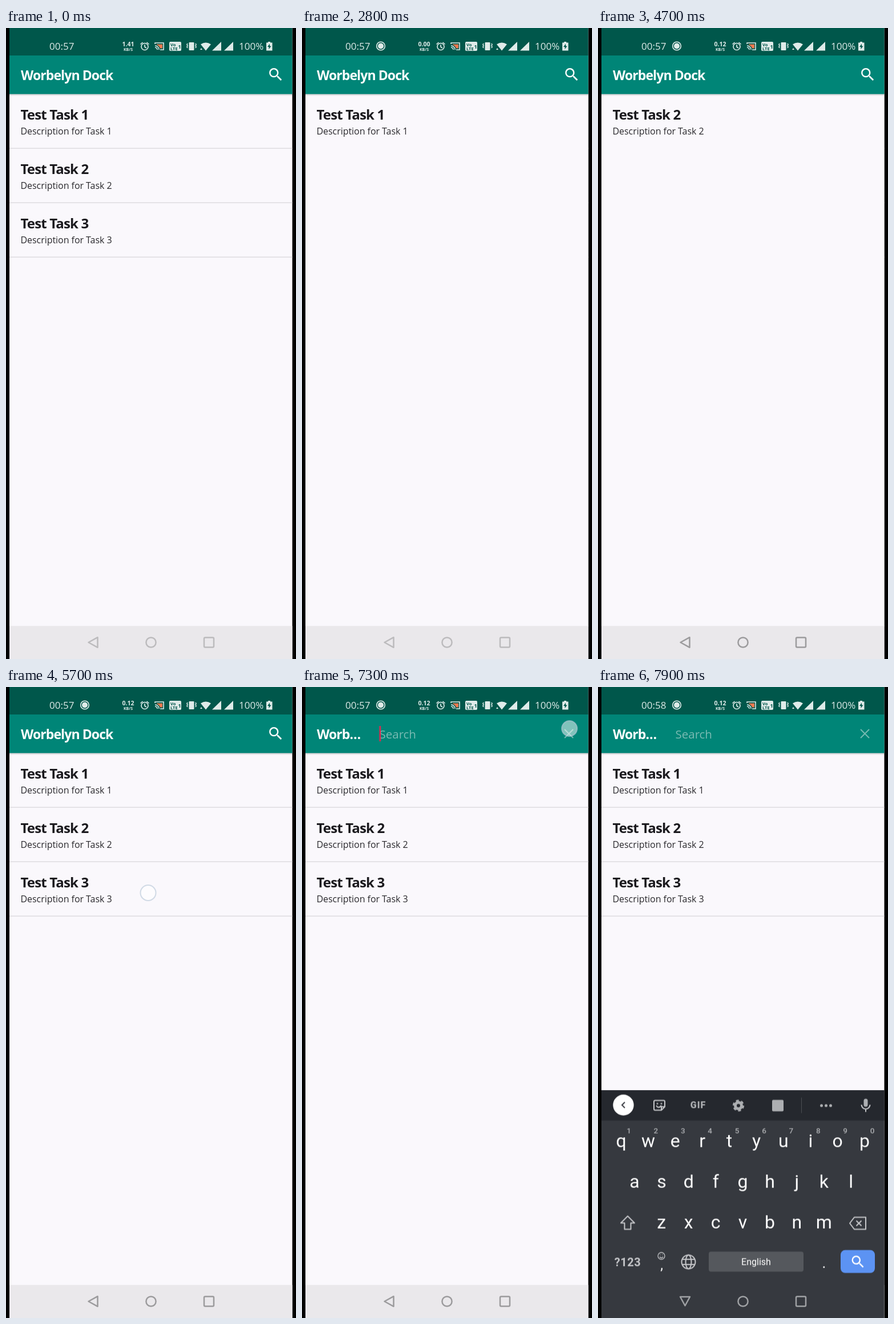
Recreate the animation shown at these times as an HTML page. Size 508 by 1102 pixels, loop 8 s.

```html
<!DOCTYPE html>
<html lang="en">
<head>
<meta charset="utf-8">
<title>Task list</title>
<style>
  html, body { margin: 0; width: 100%; height: 100%; overflow: hidden; background: #000; }
  svg { display: block; width: 100vw; height: 100vh; }
  text { font-family: "Open Sans", "Noto Sans", sans-serif; }
  .status { fill: #dfebe9; }
  .status text { font-size: 17px; }
  .status .tiny { font-size: 10.5px; font-weight: 700; text-anchor: middle; }
  .line { fill: none; stroke: #dfebe9; stroke-width: 1.6; }
  .title { font-size: 23px; font-weight: 700; letter-spacing: -.9px; fill: #fff; }
  .hint { font-size: 20.5px; fill: #7abbb3; }
  .name { font-size: 24px; font-weight: 700; letter-spacing: -.85px; fill: #1b1a1e; }
  .desc { font-size: 16px; letter-spacing: -.05px; fill: #2a292d; }
  .nav { fill: none; stroke-width: 2.5; stroke-linejoin: round; }
  .light { animation: wake 8s linear infinite; }
  .dark { stroke: #9fa1a4; }
  .keys text { font-family: Roboto, "Noto Sans", sans-serif; text-anchor: middle; fill: #fff; }
  .keys .letter { font-size: 32px; }
  .keys .digit { font-size: 13.5px; font-weight: 500; fill: #adafb2; }
  .outline { fill: none; stroke: #c6c7ca; stroke-width: 2; stroke-linejoin: round; }
  .tool { fill: #adafb2; }

  .tap, .press { animation: tap 8s linear infinite; animation-delay: calc(var(--at) - 8.04s); }
  .tap circle { fill: #fff; fill-opacity: .5; stroke: #b4c5d5; stroke-opacity: .6; stroke-width: 2; }
  .press { animation-name: press; transform-box: fill-box; transform-origin: center; }
  .record { animation: record 8s linear infinite; transform-origin: 138px 31px; }
  .keyboard { animation: appear 8s linear infinite; }
  .keys { animation: rise 8s linear infinite; }

  @keyframes tap { 0%, .6% { opacity: 1 } 2.6%, 100% { opacity: 0 } }
  @keyframes press {
    0% { opacity: .2; transform: scaleX(.4) }
    1.2%, 1.9% { opacity: 1; transform: none }
    5%, 100% { opacity: 0; transform: none }
  }
  @keyframes wake { 0%, 43.7% { stroke: #bcbbbd } 47.5%, 100% { stroke: #9c9b9d } }
  @keyframes record { 0%, 1% { opacity: 0; transform: scale(.4) } 5%, 100% { opacity: 1; transform: none } }
  @keyframes appear { 0%, 91.9% { opacity: 0 } 91.91% { opacity: .86 } 94.6%, 100% { opacity: 1 } }
  @keyframes rise { 0%, 91.9% { transform: translateY(11.5px) } 94.6%, 100% { transform: none } }
</style>
</head>
<body>
<svg viewBox="0 0 508 1102">
  <defs>
    <path id="lens" d="M15.5 14h-.79l-.28-.27A6.47 6.47 0 0 0 16 9.5 6.5 6.5 0 1 0 9.5 16c1.61 0 3.09-.59 4.23-1.57l.27.28v.79l5 4.99L20.49 19zm-6 0C7.01 14 5 11.99 5 9.5S7.01 5 9.5 5 14 7.01 14 9.5 11.99 14 9.5 14z"/>
    <g id="homeRecents"><circle cx="254" cy="1073" r="8.6"/><rect x="347" y="1064.5" width="17" height="17" rx="2"/></g>
    <linearGradient id="shade" x2="0" y2="1"><stop stop-opacity=".2"/><stop offset="1" stop-opacity="0"/></linearGradient>
  </defs>

  <rect width="508" height="1102"/>
  <rect x="6" width="495.5" height="1102" fill="#faf8fc"/>
  <g id="list"></g>
  <g id="pages"></g>

  <rect x="6" y="115" width="495.5" height="4" fill="url(#shade)"/>
  <rect x="6" y="48" width="495.5" height="67.4" fill="#008577"/>
  <rect x="6" width="495.5" height="48" fill="#00574b"/>

  <g class="status">
    <text x="76" y="37.5" data-on="0-7700">00:57</text>
    <text x="76" y="37.5" data-on="7700-8000">00:58</text>
    <g class="record"><circle class="line" cx="138" cy="31.5" r="7.3"/><circle cx="138" cy="31.5" r="5"/></g>
    <text class="tiny" x="214" y="32" data-on="0-2000">1.41</text>
    <text class="tiny" x="214" y="32" data-on="2000-4700">0.00</text>
    <text class="tiny" x="214" y="32" data-on="4700-8000">0.12</text>
    <text class="tiny" x="214" y="39.5" style="font-size:7px">KB/S</text>
    <path class="line" d="M243 29v4l3 2M235.5 28.5l4-3.5M250.5 28.5l-4-3.5"/>
    <circle class="line" cx="243" cy="32.5" r="6"/>
    <path class="line" d="M261 28v-2h15v12h-6M261 31a7 7 0 0 1 7 7M261 34a4 4 0 0 1 4 4"/>
    <path d="M264 28.5h10v7h-4q-2-5-6-6z" fill="#f0784f"/>
    <rect x="286" y="24" width="21" height="16" rx="2"/>
    <g fill="#00574b" font-weight="700">
      <text x="288" y="31.5" style="font-size:7.5px">Vo</text><text x="288" y="39" style="font-size:7.5px">LTE</text>
      <text x="301.5" y="36" style="font-size:9px">1</text>
    </g>
    <rect x="320.5" y="25" width="9" height="14" rx="1"/>
    <path class="line" d="M318 27l-1 2 1 2-1 2 1 2M332 27l1 2-1 2 1 2-1 2"/>
    <path d="M341 28.5q9-6 18 0L350 39.5zM361 39.5L377 24v15.5zM382 39.5L398 24v15.5z"/>
    <path d="M342 35l2 3h-4z"/>
    <text x="408" y="37.5">100%</text>
    <path d="M459 24h4v1.5h3.5v14H456v-14h3z"/>
    <path d="M462 27.5l-4 5.5h2.5v4l4-5.5H462z" fill="#00574b"/>
  </g>

  <g data-on="0-7300">
    <text class="title" x="26" y="90.5">Worbelyn Dock</text>
    <use href="#lens" transform="translate(457.3 66.2) scale(1.257)" fill="#fff"/>
  </g>
  <g data-on="7300-8000">
    <text class="title" x="26" y="90.5">Worb…</text>
    <text class="hint" x="135.5" y="89.5">Search</text>
    <path d="M460 74l15 15M475 74l-15 15" stroke="#74b9b0" stroke-width="2"/>
    <rect x="135.5" y="68" width="2.5" height="27" fill="#e0264f" data-on="7300-7800"/>
  </g>

  <rect x="6" y="1044.3" width="495.5" height="58" fill="#eae8eb"/>
  <g id="presses" fill="#000" fill-opacity=".135"></g>
  <g class="nav light"><path d="M144.5 1073l16-8.8v17.6z"/><use href="#homeRecents"/></g>

  <g class="keyboard">
    <g class="keys">
      <rect x="6" y="704" width="495.5" height="420" fill="#36393f"/>
      <rect x="6" y="704" width="495.5" height="53" fill="#25282e"/>
      <circle cx="44.5" cy="730" r="18.2" fill="#fff"/>
      <path d="M47 725l-5 5 5 5" fill="none" stroke="#3a3d42" stroke-width="2"/>
      <g class="tool">
        <path class="outline" d="M100 722h15q2 0 2 2v9l-6 6h-11q-2 0-2-2v-13q0-2 2-2zM117 733h-6v6M102 731q4 6 9 0"/>
        <circle cx="104" cy="727.5" r="1.5"/><circle cx="111" cy="727.5" r="1.5"/>
        <text x="175.5" y="735.5" style="font-size:16px;font-weight:900;letter-spacing:1px;fill:#adafb2">GIF</text>
        <g fill="none" stroke="#adafb2"><circle cx="246" cy="731" r="5.5" stroke-width="5"/><circle cx="246" cy="731" r="8.7" stroke-width="3" stroke-dasharray="5 4.11"/></g>
        <rect x="305" y="721" width="20" height="20" rx="2"/>
        <rect x="356" y="717" width="1" height="27" fill="#4b4e53"/>
        <circle cx="391.5" cy="731" r="2.5"/><circle cx="399.5" cy="731" r="2.5"/><circle cx="407.5" cy="731" r="2.5"/>
        <rect x="465.5" y="719" width="7" height="14" rx="3.5"/>
        <path class="outline" d="M461.5 729.5a7.5 7.5 0 0 0 15 0M469 737v5"/>
      </g>
      <g id="letters"></g>
      <path class="outline" d="M52 924l12 12h-6.5v11h-11v-11H40z"/>
      <path class="outline" d="M449 926h20v21h-20l-8-10.5zM452.5 932l9 9M461.5 932l-9 9"/>
      <text x="52" y="1011" style="font-size:20px;font-weight:700;letter-spacing:.5px;fill:#c6c7ca">?123</text>
      <circle class="outline" cx="111" cy="993.5" r="6" style="stroke-width:1.3"/>
      <path class="outline" d="M108 995q3 4 6 0M109 991v1M113 991v1" style="stroke-width:1.3"/>
      <text x="111.5" y="1017" style="font-size:24px">,</text>
      <g class="outline"><circle cx="158.5" cy="1004" r="12"/><ellipse cx="158.5" cy="1004" rx="5" ry="12"/><path d="M148 999.5h21M148 1008.5h21"/></g>
      <rect x="194" y="986" width="166" height="35" rx="4" fill="#55585d"/>
      <text x="277" y="1009.5" style="font-size:16px">English</text>
      <text x="396" y="1014" style="font-size:26px">.</text>
      <rect x="425" y="983.3" width="60" height="40" rx="8" fill="#5c93f3"/>
      <use href="#lens" transform="translate(440.9 989.4) scale(1.2)" fill="#fff"/>
    </g>
    <g class="nav dark"><path d="M144 1065h17l-8.5 15.5z"/><use href="#homeRecents"/></g>
  </g>
  <g id="taps"></g>
</svg>
<script>
  const LOOP = 8000, LEAD = 40;
  const add = (id, markup) => document.getElementById(id).insertAdjacentHTML('beforeend', markup);

  const task = (n, y) => `<text class="name" x="25.5" y="${y + 45}">Test Task ${n}</text>
    <text class="desc" x="25.5" y="${y + 71}">Description for Task ${n}</text>`;

  const tap = (x, y, at) =>
    add('taps', `<g class="tap" style="--at:${at}ms"><circle cx="${x}" cy="${y}" r="13.5"/></g>`);

  for (let n = 1; n <= 3; n++) {
    const y = 20 + n * 95;
    add('list', task(n, y) + `<rect x="6" y="${y + 94.5}" width="495.5" height="1.2" fill="#d7d5d9"/>`);
  }

  // Each visit: row tap, then the back button; pages open and close 100 ms after the tap.
  [[2600, 3500, 170], [4200, 5100, 264], [5700, 6400, 360]].forEach(([open, back, y], i) => {
    tap(249, y - .5, open);
    tap(155.5, 1076.5, back + 35);
    add('presses', `<rect class="press" style="--at:${back}ms" x="97" y="1044.5" width="110" height="57.5" rx="28"/>`);
    add('pages', `<g data-on="${open + 100}-${back + 100}">
      <rect x="6" y="115" width="495.5" height="930" fill="#faf8fc"/>${task(i + 1, 115)}</g>`);
  });
  tap(468.5, 72.5, 7300);

  ['qwertyuiop', 'asdfghjkl', 'zxcvbnm'].forEach((row, r) => {
    [...row].forEach((letter, i) => {
      const x = [40.5, 64, 111.3][r] + i * 47.4, y = 803 + r * 71;
      add('letters', `<text class="letter" x="${x}" y="${y}">${letter}</text>`);
      if (!r) add('letters', `<text class="digit" x="${x + 13.5}" y="779">${(i + 1) % 10}</text>`);
    });
  });

  // Hard on/off windows, given in ms.
  for (const el of document.querySelectorAll('[data-on]')) {
    const [from, to] = el.dataset.on.split('-').map(Number);
    const at = ms => (ms % LOOP ? ms - LEAD : ms) / LOOP;
    const key = (offset, opacity) => ({ offset, opacity, easing: 'step-end' });
    const frames = [key(at(from), 1), key(at(to), to < LOOP ? 0 : 1)];
    if (from) frames.unshift(key(0, 0));
    if (to < LOOP) frames.push(key(1, 0));
    el.animate(frames, { duration: LOOP, iterations: Infinity });
  }
</script>
</body>
</html>
```
